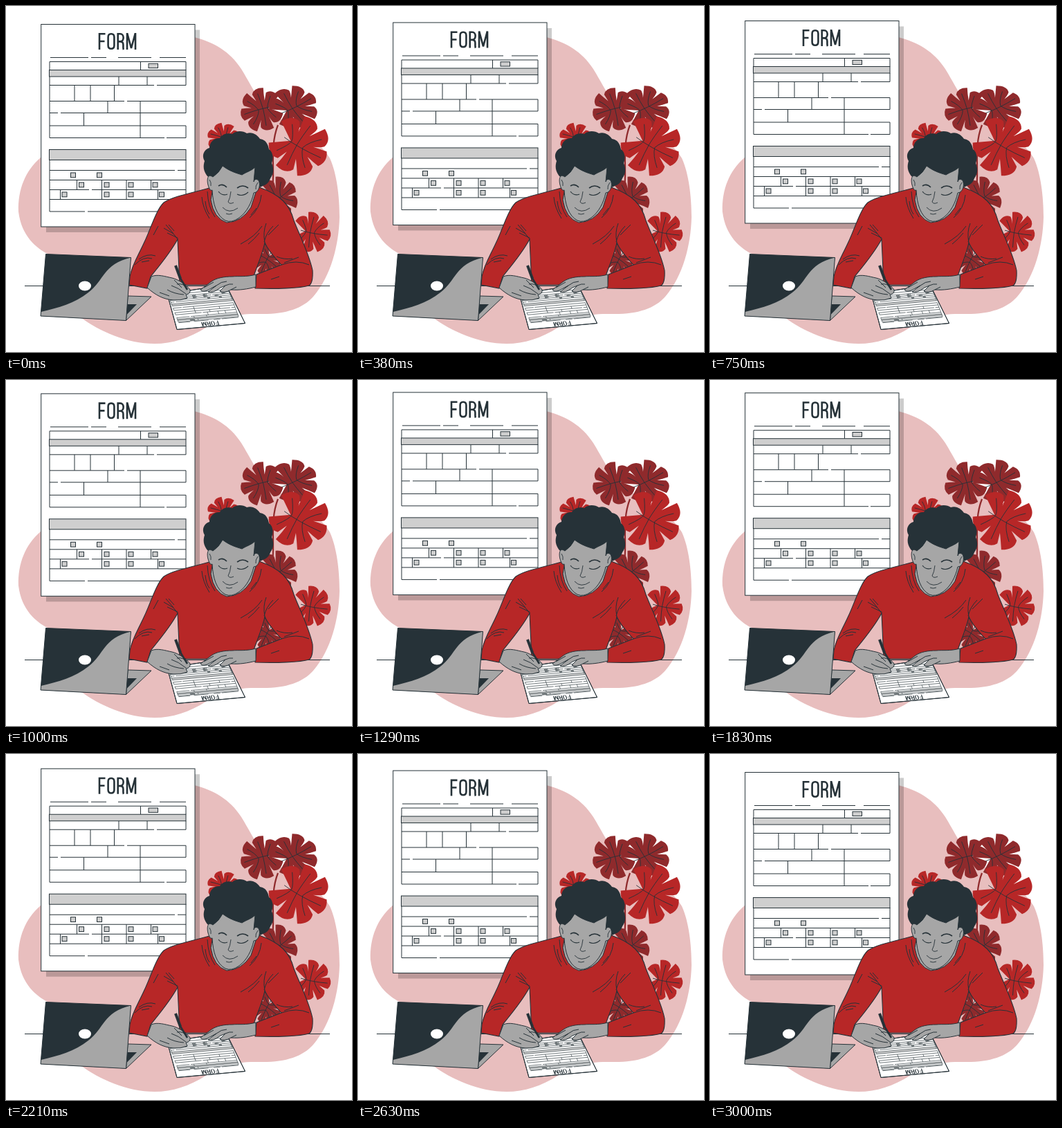
Animation of 500 by 500 pixels, one loop 3040 ms. Source, as an HTML page with a canvas:

```html
<!DOCTYPE html>
<html lang="en">
<head>
<meta charset="utf-8">
<title>Filling in a form</title>
<style>
html, body { margin: 0; width: 100%; height: 100%; overflow: hidden; background: #fff; }
canvas { display: block; width: 500px; height: 500px; }
</style>
</head>
<body>
<canvas id="stage" role="img" aria-label="FORM: a man at a desk fills in a paper form"></canvas>
<script>
const LOOP = 3040, FLOAT = 3000, LIFT = 10;
const INK = '#263238', RED = '#b72727', WINE = '#8f2a2c', PINK = '#e8bebe',
      GREY = '#a6a6a6', BAR = '#cfcfcf', WHITE = '#fff';

const canvas = document.getElementById('stage');
const ctx = canvas.getContext('2d');
const ratio = window.devicePixelRatio || 1;
canvas.width = canvas.height = 500 * ratio;

const cache = new Map();
function path(d) {
  if (!cache.has(d)) cache.set(d, new Path2D(d));
  return cache.get(d);
}
function fill(d, color) {
  ctx.fillStyle = color;
  ctx.fill(path(d));
}
function line(d, width = 1, color = INK) {
  ctx.strokeStyle = color;
  ctx.lineWidth = width;
  ctx.stroke(path(d));
}
function shape(d, color, width = 1) {
  fill(d, color);
  line(d, width);
}
function box(x, y, w, h, color, width) {
  ctx.fillStyle = color;
  ctx.fillRect(x, y, w, h);
  ctx.strokeStyle = INK;
  ctx.lineWidth = width;
  ctx.strokeRect(x, y, w, h);
}

// The form's contents, shared by the wall sheet and the paper on the desk.
const RULES =
  'M64 74.5H119M123 74.5H145M162 74.5H210M222 74.5H260' +
  'M63 92.5V80.5H260V92.5M194.5 80.5V92.5' +
  'M63 102V137.5M260 102V114.5M163 102V114.5M204 102V114.5' +
  'M63 114.5H214M218 114.5H260M99 114.5V137.5M122 114.5V137.5M156.5 114.5V137.5' +
  'M63 137.5H171M175 137.5H260V154.5M147 137.5V154.5M194 137.5V190.5' +
  'M63 137.5V190.5M63 154.5H75M79 154.5H260M112.5 154.5V173' +
  'M63 173H260V190.5M63 190.5H229M232 190.5H260';
const GRID =
  'M63 222V297M260 222V297M63 237.5H244M248 237.5H260' +
  'M63 251.5H260M63 265.5H120M124 265.5H260M63 279.5H260M63 297H114M118 297H260' +
  'M102.5 251.5V265.5M138.5 251.5V279.5M174 251.5V279.5M209.5 251.5V265.5' +
  'M78.5 265.5V279.5M219.5 265.5V279.5';
const TICKS = [[241, [93.5, 131.5]], [255, [105.5, 142, 177, 212]], [269, [81, 142, 177, 221.5]]];
const TITLE =
  'M135 63V39M133.7 40.3H143.5M135 51H142.5' +
  'M147.6 45Q147.6 40.3 152 40.3T156.4 45V57Q156.4 61.7 152 61.7T147.6 57Z' +
  'M161.7 63V39M161.7 40.3H165C171.2 40.3 171.2 51.4 165 51.4H161.7' +
  'M165 51.4Q169.4 51.4 169.4 56V60Q169.4 62 170 63' +
  'M175 63V39M187 63V39M175.2 39.5L181 61L186.8 39.5';

function title(width) {
  ctx.lineJoin = 'bevel';
  line(TITLE, width);
  ctx.lineJoin = 'miter';
}
function formBody(width) {
  line(RULES, width);
  line(GRID, width);
  box(62.5, 92.5, 197.5, 9.5, BAR, width);
  box(62.5, 207.5, 197.5, 15, BAR, width);
  box(206, 83.3, 13.5, 6.3, BAR, width);
  for (const [y, xs] of TICKS)
    for (const x of xs) box(x, y, 7, 6.8, BAR, width);
}

function board(dy) {
  ctx.save();
  ctx.translate(0, dy);
  ctx.fillStyle = 'rgba(0,0,0,.2)';
  ctx.fillRect(58, 34.5, 222, 292.5);
  box(50.7, 26.5, 222.3, 292.5, WHITE, 1);
  title(2.6);
  formBody(1);
  ctx.restore();
}

function paper() {
  const sheet = 'M233 416L318 403L345.5 458.5L247 467.5Z';
  shape(sheet, WHITE);
  ctx.save();
  ctx.clip(path(sheet));
  ctx.transform(-98 / 222, 9 / 222, -20 / 292, -53 / 292, 345, 458);
  ctx.translate(-51, -26.5);
  formBody(1.9);
  // The near edge is foreshortened less.
  ctx.translate(0, -25);
  ctx.scale(1, 1.4);
  title(2.6);
  ctx.restore();
  line(sheet);
}

// A split leaf: seven lobes swept towards the tip, with slits between them.
function leaf(x, y, rx, ry, turn, color) {
  const at = (deg, k) => {
    const a = (turn + deg) * Math.PI / 180;
    return [x + rx * k * Math.cos(a), y + ry * k * Math.sin(a)];
  };
  const step = 46;
  ctx.beginPath();
  ctx.moveTo(...at(180, .35));
  for (let i = -3; i <= 3; i++) {
    const c = i * step, side = Math.sign(i), next = c + step / 2;
    ctx.lineTo(...at(c - 18, .96 - side * .1));
    ctx.quadraticCurveTo(...at(c - side * 6, 1.13), ...at(c + 18, .96 + side * .1));
    if (i < 3) ctx.quadraticCurveTo(...at(c + 21, .75), ...at(next * 1.08, .48));
  }
  ctx.closePath();
  ctx.fillStyle = color;
  ctx.fill();
  ctx.beginPath();
  ctx.moveTo(...at(180, .6));
  ctx.quadraticCurveTo(...at(90, .08), ...at(0, .85));
  for (const i of [-3, -2, -1, 1, 2, 3]) {
    const root = .35 - Math.abs(i) * .22;
    ctx.moveTo(...at(0, root));
    ctx.quadraticCurveTo(...at(i * 52, .35), ...at(i * step, .8));
  }
  ctx.strokeStyle = INK;
  ctx.lineWidth = .9;
  ctx.stroke();
}

function plant() {
  line('M393 172C380 205 390 240 384 275C378 315 370 345 374 392', 2.2, WINE);
  line('M384 275C376 320 374 350 370 388M376 345Q395 325 420 327', 1);
  leaf(314, 191, 23, 21, 200, RED);
  leaf(369, 150, 30, 30, 165, WINE);
  leaf(416, 146, 34, 29, -30, WINE);
  leaf(424, 202, 42, 41, 30, RED);
  leaf(394, 277, 27, 29, -35, WINE);
  leaf(442, 327, 27, 28, 10, RED);
  leaf(377, 368, 19, 22, 120, WINE);
}

function backdrop() {
  fill('M272 45C300 52 324 66 340 91C350 107 358 124 370 140C390 168 446 182 468 220' +
       'C478 242 482 275 482 305C481 345 470 390 444 420C428 438 402 446 365 445' +
       'C330 444 310 452 290 464C265 480 240 488 215 488C175 488 135 470 108 450' +
       'C85 430 75 385 60 358C44 350 22 332 18 297C17 265 28 238 50 219L150 130Z', PINK);
  line('M27 404.5H468');
}

function sweater() {
  shape('M297 262C275 269 243 274 228 284C217 294 208 325 200 341C192 359 182 374 179 391' +
        'L178 403L204 408L209 391C222 375 238 356 248 337L251 403H290L358 390' +
        'C364 373 371 357 374 342C380 356 391 366 398 374L362 388L360 408' +
        'C390 409 425 408 438 404Q444 400 443 382C438 358 424 331 416 310' +
        'C410 287 397 273 366 262Z', RED, 1.1);
  line('M231 316Q240 326 248 337M228 321L242 329M235 316L243 325M233 328L248 335' +
       'M213 331L220 318M192 366Q204 357 216 361M186 374Q199 361 211 365M196 370L207 368');
  line('M376 314Q371 327 374 342M386 318Q376 328 373 341M370 318Q360 333 339 344' +
       'M366 328Q359 337 350 344M379 331L394 316M398 374Q420 366 438 374' +
       'M402 371L423 363M391 362Q402 367 414 365M383 395L395 391');
  line('M283 276Q284 291 294 307M288 282Q289 294 294 301M291 268Q292 291 302 305' +
       'M369 273Q367 293 352 306M362 292L354 302');
}

function head() {
  shape('M299 263L296 280Q300 307 319 313Q341 312 354 291L363 263Z', GREY);
  fill('M293 248C284 239 285 230 287 224C282 215 287 207 294 205C294 196 302 190 309 191' +
       'C314 183 323 184 327 185C334 179 343 181 348 184C356 181 364 187 367 192' +
       'C376 193 379 201 380 207C387 212 386 222 384 227C388 237 386 244 382 249' +
       'C380 258 371 260 362 264L340 250Z', INK);
  shape('M299 247C289 240 290 257 294 264Q296 268 298 266C299 286 304 303 317 310' +
        'Q326 314 337 306C348 298 355 284 358 270C366 270 369 256 364 251' +
        'Q359 249 358 254L360 233C353 239 347 240 341 244C331 241 322 238 313 231' +
        'Q308 241 299 247Z', GREY);
  line('M307 260Q313 256 319 262M334 263Q342 257 350 263', 1.6);
  line('M307 268Q312 275 320 272M334 272Q342 276 350 269', 1.1);
  line('M325 268Q324 278 321 283Q323 287 329 284M313 291Q322 301 335 292M318 300Q322 302 327 300' +
       'M294 251Q297 255 296 260M364 255Q360 260 361 265', .9);
}

function hands() {
  shape('M210 391C219 387 230 391 240 393C249 395 261 403 266 410Q267 416 260 417' +
        'L262 422Q252 426 242 425C228 424 216 418 204 407Z', GREY);
  line('M239 404Q249 407 260 416M233 410Q243 416 257 417M243 396L254 407M222 414L236 419');
  line('M245 375L252 394', 4);
  line('M251 392L262 410', 2.6);
  line('M247 402Q256 400 262 408');
  shape('M361 388C347 392 336 390 327 391C315 391 304 393 297 398L281 410Q283 414 291 411' +
        'L304 404L292 413Q298 416 310 407L317 404L309 412Q315 416 325 410C337 411 349 409 361 406Z', GREY);
  line('M286 407L300 399M304 404Q311 398 319 398M317 404Q323 401 328 402M325 410L333 406');
}

function laptop() {
  const lid = 'M57.5 358.5L180.5 363.5L173.5 454.5L50 448Z';
  shape('M173.5 454.5L210 420L176 419Z', GREY);
  fill('M175 431H189L173.5 447Z', INK);
  fill(lid, INK);
  fill('M180.5 363.5C140 373 142 397 119 414C99 430 76 436 50.5 442L50 448L173.5 454.5Z', GREY);
  line(lid);
  ctx.fillStyle = WHITE;
  ctx.beginPath();
  ctx.ellipse(114, 404.5, 9, 7, 0, 0, 7);
  ctx.fill();
}

function draw(now) {
  const t = Math.min(now % LOOP, FLOAT) / FLOAT;
  const lift = LIFT * (1 - Math.abs(1 - 2 * t));
  ctx.setTransform(ratio, 0, 0, ratio, 0, 0);
  ctx.fillStyle = WHITE;
  ctx.fillRect(0, 0, 500, 500);
  backdrop();
  board(-lift);
  plant();
  sweater();
  head();
  paper();
  hands();
  laptop();
}

const start = performance.now();
function tick() {
  draw(performance.now() - start);
  requestAnimationFrame(tick);
}
tick();
</script>
</body>
</html>
```
